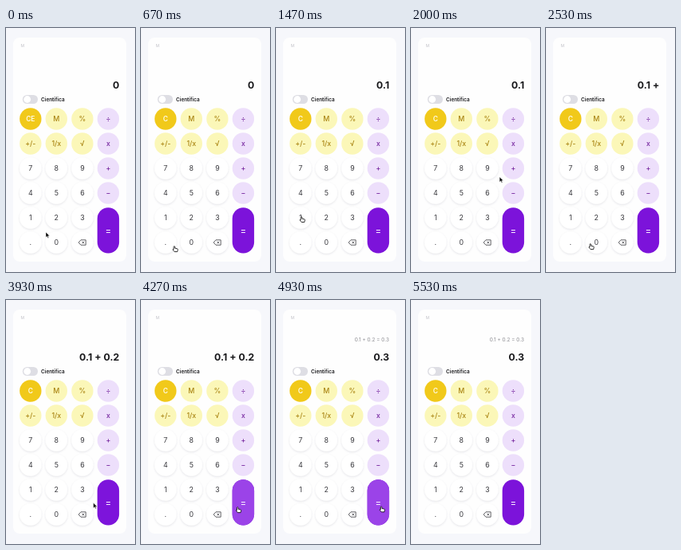
Write an HTML page that moves like this. It is 162 px wide and 306 px high and loops after 5.59 s.

```html
<!DOCTYPE html>
<html lang="es">
<head>
<meta charset="utf-8">
<title>Calculadora</title>
<style>
  html, body { margin: 0; width: 100%; height: 100%; overflow: hidden; background: #f6f7fb; }
  svg { display: block; width: 162px; height: 306px; font-family: Inter, "Open Sans", sans-serif; }
  .key { font-size: 8.8px; font-weight: 500; text-anchor: middle; }
  .digit { font-weight: 400; }
  .clear { font-size: 8.4px; font-weight: 600; }
  .equals { font-size: 11px; }
  .end { text-anchor: end; }
</style>
</head>
<body>
<svg id="stage" viewBox="0 0 162 306">
  <defs>
    <filter id="soft" x="-30%" y="-30%" width="160%" height="170%">
      <feDropShadow dx="0" dy="1" stdDeviation="1.1" flood-color="#50506e" flood-opacity=".16"/>
    </filter>
  </defs>
  <rect width="162" height="306" fill="#f6f7fb"/>
  <rect x="9" y="12" width="142" height="281" rx="8" fill="#fefefe"/>
  <text x="18.4" y="24" font-size="5" fill="#c2c2c8">M</text>
  <text id="history" class="end" x="142" y="52" font-size="6.5" fill="#8d8d92"></text>
  <text id="display" class="end" x="142.3" y="75.7" font-size="12.3" font-weight="700" fill="#18181b"></text>
  <rect x="20.8" y="84" width="19.2" height="11" rx="5.5" fill="#dedee4"/>
  <circle cx="26.7" cy="89.5" r="4.4" fill="#fff"/>
  <text x="44" y="91.7" font-size="6.4" font-weight="600" fill="#18181b">Científica</text>
  <g id="keys"></g>
  <g id="cursor">
    <path id="arrow" d="M0 0V6.6L1.6 5.2L2.6 7.5L3.7 7L2.7 4.8H4.8Z" fill="#000" stroke="#fff" stroke-width=".5"/>
    <path id="hand" d="M0 1.2Q.8 0 1.6 1.2V3.2L4.4 3.8Q5.4 4.1 5.2 5.2L4.6 7.6H1L-1.2 5Q-1 4 0 4.7Z" fill="#fff" stroke="#000" stroke-width=".8" stroke-linejoin="round"/>
  </g>
</svg>
<script>
const LOOP = 5590, TICK = 200 / 3;
const COLS = [30.8, 63.3, 95.9, 128.4], ROWS = [114, 145, 176, 207, 238, 269], R = 13.7;
const LABELS = ['CE M % ÷', '+/- 1/x √ x', '7 8 9 +', '4 5 6 -', '1 2 3', '. 0 ⌫'];
const STYLES = {
  clear: ['#f1c91a', '#fffbe8'],
  func: ['#fbf7b8', '#a98412'],
  op: ['#eddffb', '#76269f'],
  digit: ['#fff', '#3a3a3f']
};

// time, tip x, tip y
const PATH = [
  [0, 50, 256], [200, 59, 267], [530, 59, 269], [670, 41, 273], [800, 32, 271],
  [1200, 31, 270], [1400, 31, 236], [1800, 32, 235], [2070, 127, 177], [2200, 127, 177],
  [2400, 60, 267], [2530, 55, 270], [2670, 53, 270], [2870, 33, 271], [3130, 32, 271],
  [3400, 58, 243], [3700, 59, 243], [4000, 117, 256], [4270, 120.5, 259],
  [4800, 121, 259], [5000, 135, 258], [5200, 166, 256]
];
const TEXTS = [
  [0, '0'], [930, '0.'], [1400, '0.1'], [2130, '0.1 +'], [2600, '0.1 + 0'],
  [3070, '0.1 + 0.'], [3600, '0.1 + 0.2'], [4470, '0.3']
];

const $ = id => document.getElementById(id);
const keys = $('keys');
const spots = [];

function add(tag, attrs, text) {
  const el = document.createElementNS('http://www.w3.org/2000/svg', tag);
  for (const name in attrs) el.setAttribute(name, attrs[name]);
  if (text) el.textContent = text;
  keys.append(el);
  return el;
}

function styleOf(row, col) {
  if (col === 3) return 'op';
  if (row > 1) return 'digit';
  return row + col === 0 ? 'clear' : 'func';
}

LABELS.forEach((line, row) => line.split(' ').forEach((label, col) => {
  const x = COLS[col], y = ROWS[row], kind = styleOf(row, col);
  const [fill, ink] = STYLES[kind];
  spots.push([x, y]);
  const disc = add('circle', { cx: x, cy: y, r: R, fill });
  if (kind === 'digit') disc.setAttribute('filter', 'url(#soft)');
  if (label === '⌫') {
    add('path', {
      d: `M${x - 4.7} ${y}l2.8-3.2h6.2v6.4h-6.2zM${x - .4} ${y - 1.3}l2.6 2.6m0-2.6l-2.6 2.6`,
      fill: 'none', stroke: ink, 'stroke-width': .8, 'stroke-linejoin': 'round'
    });
  } else {
    const shown = label === '-' ? '−' : label;
    const text = add('text', { class: `key ${kind}`, x, y: y + 3.2, fill: ink }, shown);
    if (kind === 'clear') text.id = 'clear';
  }
}));

const pill = { x: COLS[3] - R, y: 225.2, width: 2 * R, height: 57.2, rx: R };
add('rect', { ...pill, fill: '#7c13da' });
const glow = add('rect', { ...pill, fill: '#9b43e8' });
add('text', { class: 'key equals', x: COLS[3], y: 257.8, fill: '#f6eaff' }, '=');

const clamp = v => Math.min(1, Math.max(0, v));
const ease = v => v * v * (3 - 2 * v);

function pointAt(t) {
  const i = PATH.findIndex(p => p[0] > t);
  if (i < 0) return PATH[PATH.length - 1].slice(1);
  const a = PATH[i - 1], b = PATH[i];
  const k = ease((t - a[0]) / (b[0] - a[0]));
  return [a[1] + (b[1] - a[1]) * k, a[2] + (b[2] - a[2]) * k];
}

function overKey(x, y) {
  const top = pill.y + R, bottom = pill.y + pill.height - R;
  const py = Math.min(bottom, Math.max(top, y));
  return [...spots, [COLS[3], py]].some(([cx, cy]) => Math.hypot(x - cx, y - cy) < R);
}

function draw(t) {
  const [x, y] = pointAt(t), over = overKey(x, y);
  $('cursor').setAttribute('transform', `translate(${x} ${y})`);
  $('cursor').style.display = t < 5200 ? '' : 'none';
  $('hand').style.display = over ? '' : 'none';
  $('arrow').style.display = over ? 'none' : '';
  $('display').textContent = TEXTS.filter(s => s[0] <= t + 4).pop()[1];
  $('history').textContent = t >= 4460 ? '0.1 + 0.2 = 0.3' : '';
  $('clear').textContent = t < 330 ? 'CE' : 'C';
  glow.setAttribute('opacity', clamp((t - 3930) / 150) - clamp((t - 5000) / 150));
}

const start = performance.now();
function frame() {
  const t = (performance.now() - start) % LOOP;
  draw(Math.floor((t + 4) / TICK) * TICK);
  requestAnimationFrame(frame);
}
frame();
</script>
</body>
</html>
```
